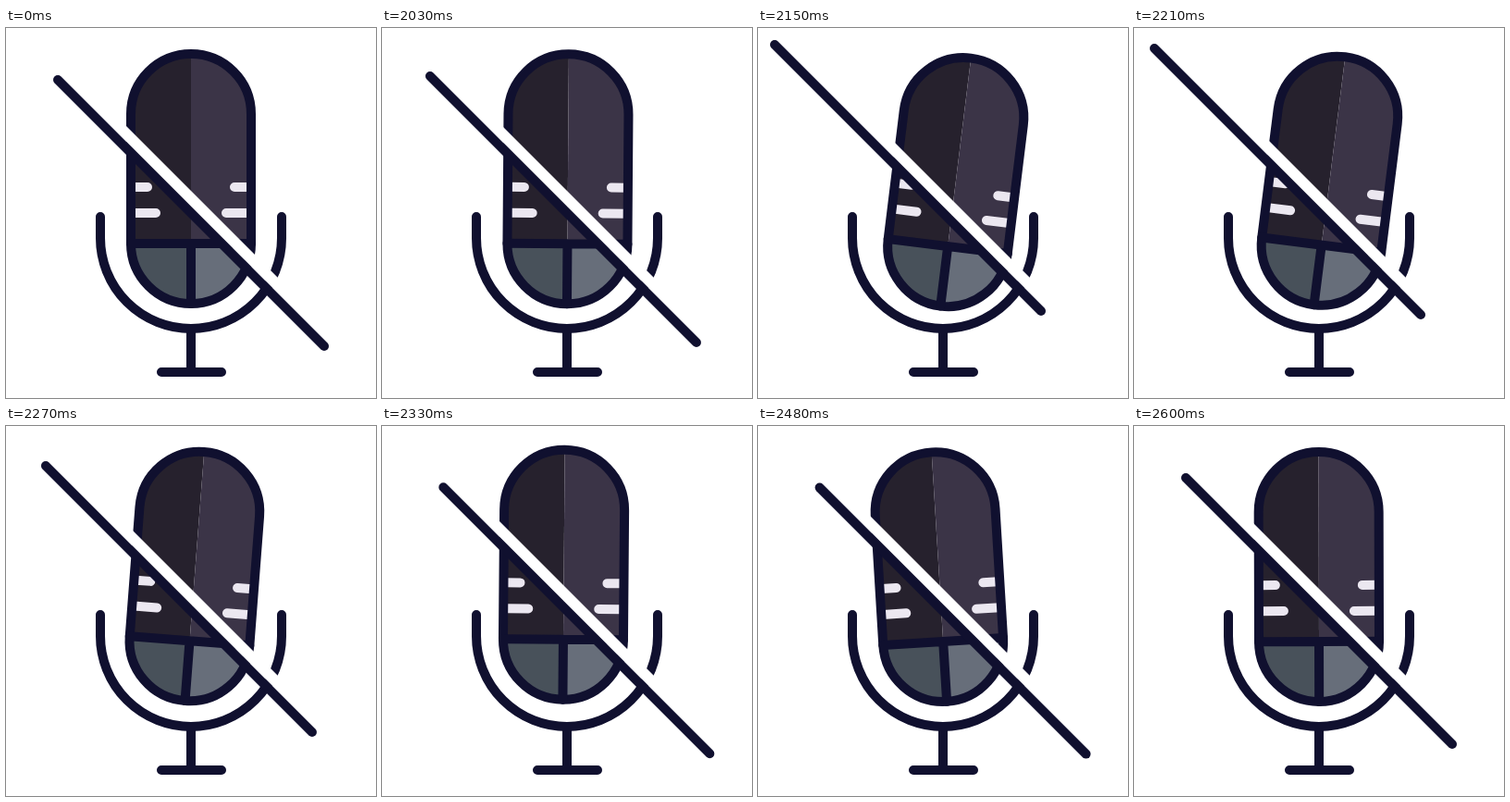
Write an HTML page that moves like this. It is 400x400 px and loops after 2.63 s.

```html
<!DOCTYPE html>
<html lang="en">
<head>
<meta charset="utf-8">
<title>Muted microphone</title>
<style>
  html, body { margin: 0; height: 100%; overflow: hidden; background: #fff; }
  svg { display: block; width: 100%; height: 100%; }
  .line { fill: none; stroke: #10102f; stroke-width: 10; stroke-linecap: round; }
  .glint { stroke: #ebe7f0; }
  .gap { stroke: #fff; stroke-width: 12; }
</style>
</head>
<body>
<svg viewBox="0 0 400 400">
  <clipPath id="capsule"><rect x="135" y="28" width="130" height="270" rx="65"/></clipPath>
  <path class="line" d="M102 204V227A98 98 0 0 0 298 227V204M200 325V372M168 372H233"/>
  <g id="mic">
    <g clip-path="url(#capsule)">
      <path fill="#26212d" d="M135 28h65v205h-65z"/>
      <path fill="#3b3447" d="M200 28h65v205h-65z"/>
      <path fill="#48515a" d="M135 233h65v65h-65z"/>
      <path fill="#676e7a" d="M200 233h65v65h-65z"/>
      <path class="line glint" d="M137 172H153M137 200H162M263 172H247M263 200H238"/>
    </g>
    <rect class="line" x="135" y="28" width="130" height="270" rx="65"/>
    <path class="line" d="M135 233H265M200 233V298"/>
  </g>
  <path class="line gap" d="M100 84.5L320 304.5"/>
  <path class="line" id="slash" d="M56 56L344 344"/>
</svg>
<script>
  const LOOP = 2630, START = 2030, STEP = 30;
  const mic = document.getElementById('mic');
  const slash = document.getElementById('slash');

  // Keys are [ms, value] pairs, eased in and out between neighbours
  const slide = [[2002, 0], [2140, -38], [2177, -38], [2380, 19], [2597, 0]];
  const tilt = [[2005, 0], [2180, 7.6], [2440, -4], [2620, 0]];
  const sway = [[2005, 0], [2145, 1.3], [2340, -0.95], [2485, 0]];

  function valueAt(keys, t) {
    const i = keys.findIndex(key => key[0] > t);
    if (i < 0) return keys[keys.length - 1][1];
    if (i === 0) return keys[0][1];
    const [t0, v0] = keys[i - 1], [t1, v1] = keys[i];
    const x = (t - t0) / (t1 - t0);
    return v0 + (v1 - v0) * x * x * (3 - 2 * x);
  }

  function draw(now) {
    const t = START + Math.floor((now % LOOP - START) / STEP) * STEP;
    const shift = valueAt(slide, t), push = valueAt(sway, t);
    slash.setAttribute('transform', `translate(${shift} ${shift})`);
    mic.setAttribute('transform',
      `translate(${4.3 * push} ${2.4 * push}) rotate(${valueAt(tilt, t)} 200 230)`);
  }

  const begin = performance.now();
  function tick() {
    draw(performance.now() - begin);
    requestAnimationFrame(tick);
  }
  tick();
</script>
</body>
</html>
```
